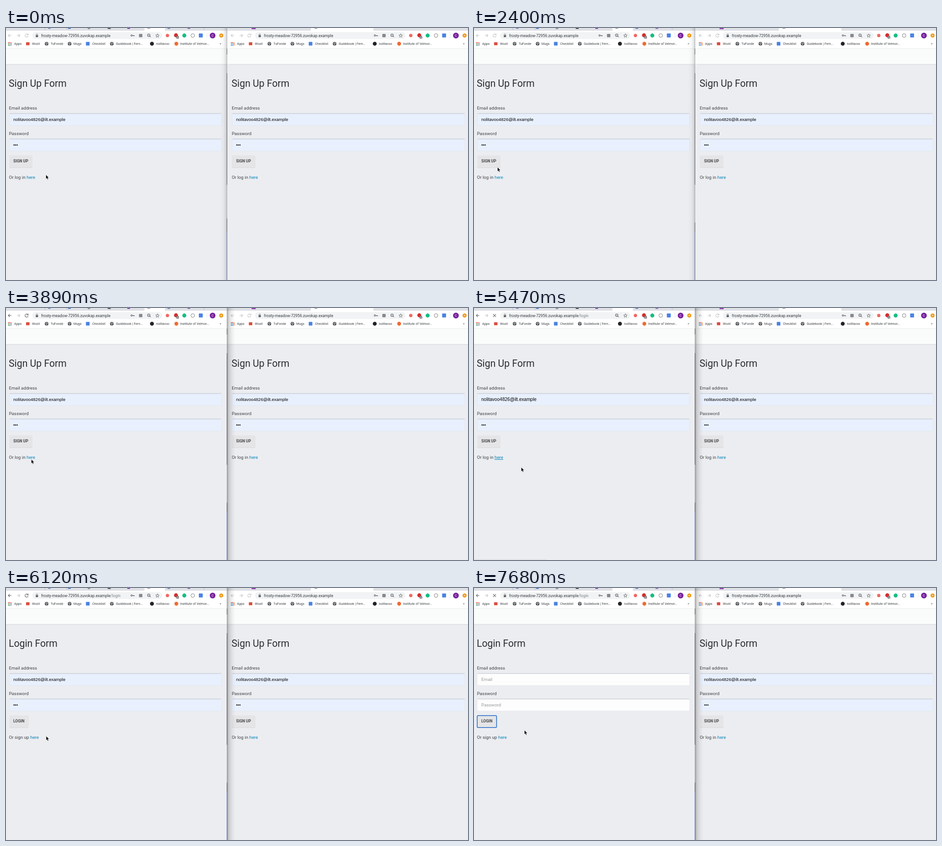
Animation of 1013x553 px, one loop 8000 ms. Source, as an HTML page:

```html
<!DOCTYPE html>
<html lang="en">
<head>
<meta charset="utf-8">
<title>Sign up and log in</title>
<style>
  html, body { margin: 0; width: 100%; height: 100%; overflow: hidden; background: #ecedf1; }
  svg { display: block; width: 100%; height: 100%; }
  text { font-family: Roboto, sans-serif; white-space: pre; }
  .url { font-size: 8.55px; fill: #35383c; }
  .mark { font-size: 7.1px; fill: #3c4043; }
  .title { font-size: 21.2px; fill: #2c2d31; }
  .label { font-size: 9.8px; fill: #414246; }
  .hint { font-size: 9.8px; fill: #97999b; }
  .value { font-family: "Liberation Sans", Arial, sans-serif; font-size: 9.5px; fill: #000; }
  .button { font-size: 8.5px; font-weight: 700; fill: #47484b; }
  .link { fill: #0786b8; }
  .line { fill: none; stroke: #5f6368; stroke-width: 1.1; }
  .pale { stroke: #c3c5c8; }
</style>
</head>
<body>
<svg id="stage" viewBox="0 0 1013 553" xmlns="http://www.w3.org/2000/svg"></svg>
<script>
const LOOP = 8000;
const HOST = 'frosty-meadow-72956.zuvokap.example';
const EMAIL = 'nolitavoo4826@ilt.example';

const rect = (x, y, w, h, fill, more = '') =>
  `<rect x="${x}" y="${y}" width="${w}" height="${h}" fill="${fill}" ${more}/>`;
const dot = (x, y, r, fill, more = '') =>
  `<circle cx="${x}" cy="${y}" r="${r}" fill="${fill}" ${more}/>`;
const text = (x, y, kind, body, more = '') =>
  `<text x="${x}" y="${y}" class="${kind}" ${more}>${body}</text>`;
const line = (d, more = '') => `<path class="line" d="${d}" ${more}/>`;
const group = (id, body, more = '') => `<g id="${id}" ${more}>${body}</g>`;
const offset = (x, y) => `matrix(1 0 0 1 ${x} ${y})`;
const at = (x, body) => `<g transform="${offset(x, 0)}">${body}</g>`;

const globe = x => dot(x, 34.5, 4, '#4a4d51') +
  `<path d="M${x - 3} 33l2.4 1.2 1 1.8-1 1.8M${x + .6} 31.2l-.6 1.4 1.8 1.2 1.6-.5" fill="none" stroke="#fff" stroke-width=".9"/>`;

const BACK = 'M11.8 16.5H5.2M8.3 13.2 5 16.5l3.3 3.3';
const FORWARD = 'M23.8 16.5h6.6M27.2 13.2l3.3 3.3-3.3 3.3';
const RELOAD = 'M47.8 14.3a3.5 3.5 0 1 0 .8 3M48.7 12.6v2.7H46';

function bookmarks() {
  const tiles = ['#e0483c', '#e0483c', '#e8a33a', '#3f9d58', '#4a80e0', '#e0483c', '#3f9d58', '#4a80e0', '#e8a33a'];
  const grid = tiles.map((c, i) => rect(4.7 + i % 3 * 3, 31 + Math.floor(i / 3) * 3, 2, 2, c)).join('');
  const labels = [[18, 'Apps'], [57, 'Wozil'], [98, 'TuFonde'], [148, 'Mugs'], [189, 'Checklist'],
    [241, 'Guidebook | Fern...'], [329, 'nolitavoo'], [382, 'Institute of Velmor...']];
  return grid + rect(44, 31.3, 7.5, 6.5, '#dd4b3e') + [89, 139.5, 232].map(globe).join('') +
    rect(175.3, 30.5, 8, 8, '#4a83e4', 'rx="1"') + dot(320, 34.5, 4.3, '#202327') +
    dot(373.5, 34.5, 4.2, '#ef6a32') + labels.map(([x, s]) => text(x, 37.2, 'mark', s)).join('');
}

function tools(name) {
  return group(name + 'Key', dot(275.3, 16.5, 1.6, 'none', 'class="line"') + line('M277 16.5h4.2v1.8M279.4 16.5v1.4')) +
    group(name + 'Lang', rect(291.6, 13, 7.4, 7.2, '#85888c', 'rx="1"')) +
    dot(313, 15.8, 2.8, 'none', 'class="line"') + line('M315 17.8l2.4 2.4M311.8 15.8h2.4') +
    line('M332 12.7l1.1 2.6 2.8.2-2.1 1.9.6 2.8-2.4-1.5-2.4 1.5.6-2.8-2.1-1.9 2.8-.2z', 'style="stroke-width:.9"') +
    dot(354, 16.5, 3.7, '#f06a64') + dot(372.7, 16, 4.4, '#d3302f') +
    rect(373.5, 17.5, 5.6, 6, '#777a7e', 'rx="1"') + text(374.9, 22.5, 'mark', '5', 'style="font-size:5px;fill:#fff"') +
    dot(391, 16.5, 4.4, '#17bd83') + dot(409.5, 16.5, 4, '#fff', 'stroke="#77797c"') +
    rect(422.8, 12, 8.6, 8.8, '#4a83e4', 'rx="1"') + line('M440.5 11v11', 'style="stroke:#dadce0;stroke-width:.7"') +
    dot(453, 16.5, 6.3, '#77209d') + text(450.4, 19.2, 'mark', 'C', 'style="fill:#fff"') +
    dot(472, 16.5, 4.5, '#f19c1b') + dot(472, 16.5, 1.3, '#fff0cf') +
    text(468.5, 37, 'mark', '»');
}

function chrome(name, width, shift) {
  return rect(0, 0, width, 553, '#ecedf1') + rect(0, 0, width, 45, '#fff') + rect(0, 0, width, 6, '#dfe1e5') +
    rect(0, 45, width, 34, '#fafcfb') + rect(0, 44.6, width, .8, '#e3e5e7') +
    rect(0, 79, width, 1, '#dedfe2') + rect(0, 80, width, 1.5, '#e6e7ea') +
    rect(57.5, 9, 285 + shift, 15.2, '#f1f3f4', 'rx="7.6"') +
    line(BACK, `id="${name}Back"`) + line(FORWARD, 'style="stroke:#c3c5c8"') + line(RELOAD, `id="${name}Reload"`) +
    rect(65.3, 15.8, 5, 4.2, '#5f6368', 'rx=".6"') + line('M66.4 16v-1.6a1.4 1.4 0 0 1 2.8 0V16', 'style="stroke-width:.9"') +
    text(77, 19.5, 'url', `${HOST}<tspan id="${name}Path" fill="#7d8287"></tspan>`) +
    bookmarks() + at(shift, tools(name));
}

const field = (y, width, fill) => rect(7, y, width, 27, fill, 'rx="2.5" stroke="#dfe2e8" stroke-width=".7"') +
  rect(8, y, width - 2, 1, '#c8ccd4') + rect(8, y + 1, width - 2, 1, '#8d95a5', 'opacity=".13"');

function inputs(name, width) {
  return group(name + 'Filled', field(187, width, '#e8f0fd') + field(243, width, '#e8f0fd') +
      text(16, 204, 'value', EMAIL, `id="${name}Email"`) + text(16, 259.8, 'value', '•••')) +
    group(name + 'Empty', field(187, width, '#fcfdfc') + field(243, width, '#fcfdfc') +
      text(16, 204, 'hint', 'Email') + text(16, 260, 'hint', 'Password'), 'visibility="hidden"');
}

const formText = (name, title, action, prompt, width) => text(6, 129, 'title', title) +
  rect(7, 280, width, 27, '#d9dadd', 'rx="2"') + rect(7, 279.5, width, 26.5, '#e5e5e7', `rx="2" id="${name}Face"`) +
  text(16, 295.3, 'button', action, `id="${name}Action"`) +
  text(6.4, 331, 'label', `${prompt} <tspan class="link" id="${name}Link">here</tspan>`);

const labels = text(6.4, 179, 'label', 'Email address') + text(6.4, 235, 'label', 'Password');
const signup = name => formText(name, 'Sign Up Form', 'SIGN UP', 'Or log in', 51);

const leftTabs = [85, 133, 181, 229].map(x => rect(x, 0, .8, 4, '#a6a9ae')).join('') +
  [[92, '#7d8fc4'], [136, '#3d6fd0'], [179, '#7f8488'], [223, '#34373a'], [266, '#7b34a8'], [354, '#5f7fc8'], [398, '#8a62b4']]
    .map(([x, c]) => rect(x, 0, 6, 1.8, c)).join('') +
  rect(303.5, 0, 45, 6, '#fff') + rect(310, 0, 6, 1.6, '#9b9ea2', 'id="favicon"') + rect(434, 0, .8, 4, '#a6a9ae');

const rightTabs = rect(50, 0, 9, 2.5, '#8a3cae') + rect(180, 0, 137, 6, '#fff') + rect(188, 0, 6, 1.6, '#9b9ea2');

document.getElementById('stage').innerHTML = `
  <defs>
    <linearGradient id="fadeLeft"><stop offset="0" stop-opacity="0"/><stop offset=".55" stop-opacity=".035"/><stop offset="1" stop-opacity=".15"/></linearGradient>
    <linearGradient id="fadeRight"><stop offset="0" stop-opacity=".32"/><stop offset=".22" stop-opacity=".14"/><stop offset=".6" stop-opacity=".05"/><stop offset="1" stop-opacity="0"/></linearGradient>
  </defs>` +
  chrome('left', 485, 0) + leftTabs + labels + inputs('left', 466) +
  group('signup', signup('signup')) +
  group('login', formText('login', 'Login Form', 'LOGIN', 'Or sign up', 42.5) +
    rect(7, 280, 42.5, 26.3, 'none', 'rx="2" stroke="#1967c8" stroke-width="1.5" id="ring"')) +
  rect(-3, 551.6, 163, 4, '#dfe0e3', 'rx="2" id="status"') +
  at(488.5, rect(-3.5, 0, 528, 553, '#ecedf1') + chrome('right', 525, 45) + rightTabs + labels + inputs('right', 511) + signup('right')) +
  rect(485, 0, 3.6, 6, '#dfe1e5') + rect(485, 6, 3.6, 39, '#fff') + rect(485, 45, 3.6, 34, '#fafcfb') +
  rect(470, 0, 14, 553, 'url(#fadeLeft)', 'id="shadeLeft"') +
  rect(485, 0, 18, 553, 'url(#fadeRight)', 'id="shadeRight"') +
  rect(484, 0, 1, 553, '#a8a9ad') + rect(484, 45, 1, 13, '#56585c') + rect(484, 99, 1, 245, '#4c4e53') +
  rect(484, 418, 1, 30, '#4c4e53', 'id="sliver"') + rect(484, 448, 1, 105, '#4d67a0') +
  group('cursor',
    `<path id="arrow" d="M0 0v9.3l2.1-1.9 1.5 3.3 1.6-.7-1.4-3.2h2.8z" fill="#000" stroke="#fff" stroke-width=".6"/>
     <path id="hand" d="M-.8 1q0-1 .8-1t.8 1v3l3 .6q1 .2 .9 1.4l-.5 3-.7 1.8h-3.7L-2.3 7.6q-.6-1 .3-1.3l1.2.8z" fill="#fff" stroke="#000" stroke-width=".8"/>`);

// time, x, y, and 1 where the pointer is a hand
const pointer = [
  [0, 87.5, 322], [330, 82, 327], [480, 70, 333], [620, 61, 332], [770, 57, 329],
  [1800, 56, 327.5], [1950, 55, 326], [2400, 51.5, 305.5], [2540, 46, 297], [2690, 43, 292.5],
  [2990, 45, 299], [3140, 50, 315], [3290, 55, 329], [3430, 55.5, 332],
  [4700, 55.5, 330, 1], [4850, 56, 328, 1], [5290, 74, 337], [5470, 103.5, 349.5],
  [5970, 98, 338], [6120, 88, 325], [6300, 80, 319], [6450, 70, 313], [6620, 59, 306],
  [6770, 48, 299, 1], [6930, 42, 295, 1], [7090, 40, 294.3, 1], [7390, 110.5, 312]
];

const el = id => document.getElementById(id);
const show = (id, on) => el(id).setAttribute('visibility', on ? 'visible' : 'hidden');

function render(t) {
  const within = (from, to = LOOP) => t >= from && t < to;
  const [, x, y, hand] = pointer.findLast(step => step[0] <= t);
  const active = within(3890), login = within(5650);
  const loading = within(5290, 5970) || within(7680);
  const filled = !login || within(5820, 7240);
  const pressed = within(7090, 7390);

  el('cursor').setAttribute('transform', offset(x, y));
  show('arrow', !hand);
  show('hand', hand);
  show('signup', !login);
  show('login', login);
  show('ring', within(7390));
  show('leftFilled', filled);
  show('leftEmpty', !filled);
  show('leftKey', !within(5290, 5820));
  show('leftLang', !within(5290, 5650));
  show('shadeLeft', !active);
  show('shadeRight', active);
  show('status', within(4700, 5820));
  show('favicon', !within(5290, 5650) && !within(7680));

  el('favicon').setAttribute('fill', within(5650, 5820) ? '#4a83e4' : '#9b9ea2');
  el('leftPath').textContent = within(5290) ? '/login' : '';
  el('leftEmail').style.fontSize = within(5290, 5650) ? '10.07px' : '';
  el('signupLink').setAttribute('text-decoration', within(4700) ? 'underline' : 'none');
  el('loginAction').setAttribute('y', pressed ? 296.3 : 295.3);
  el('loginFace').setAttribute('fill', pressed ? '#eaeaec' : '#e5e5e7');
  el('leftBack').classList.toggle('pale', !active);
  el('leftReload').classList.toggle('pale', !active);
  el('leftReload').setAttribute('d', loading ? 'M41.8 13.3l6.4 6.4M48.2 13.3l-6.4 6.4' : RELOAD);
  const top = within(1070) ? 427 : 418;
  el('sliver').setAttribute('y', top);
  el('sliver').setAttribute('height', 448 - top);
}

['rightBack', 'rightReload'].forEach(id => el(id).classList.add('pale'));
const start = performance.now();
function tick() {
  render((performance.now() - start) % LOOP);
  requestAnimationFrame(tick);
}
tick();
</script>
</body>
</html>
```
